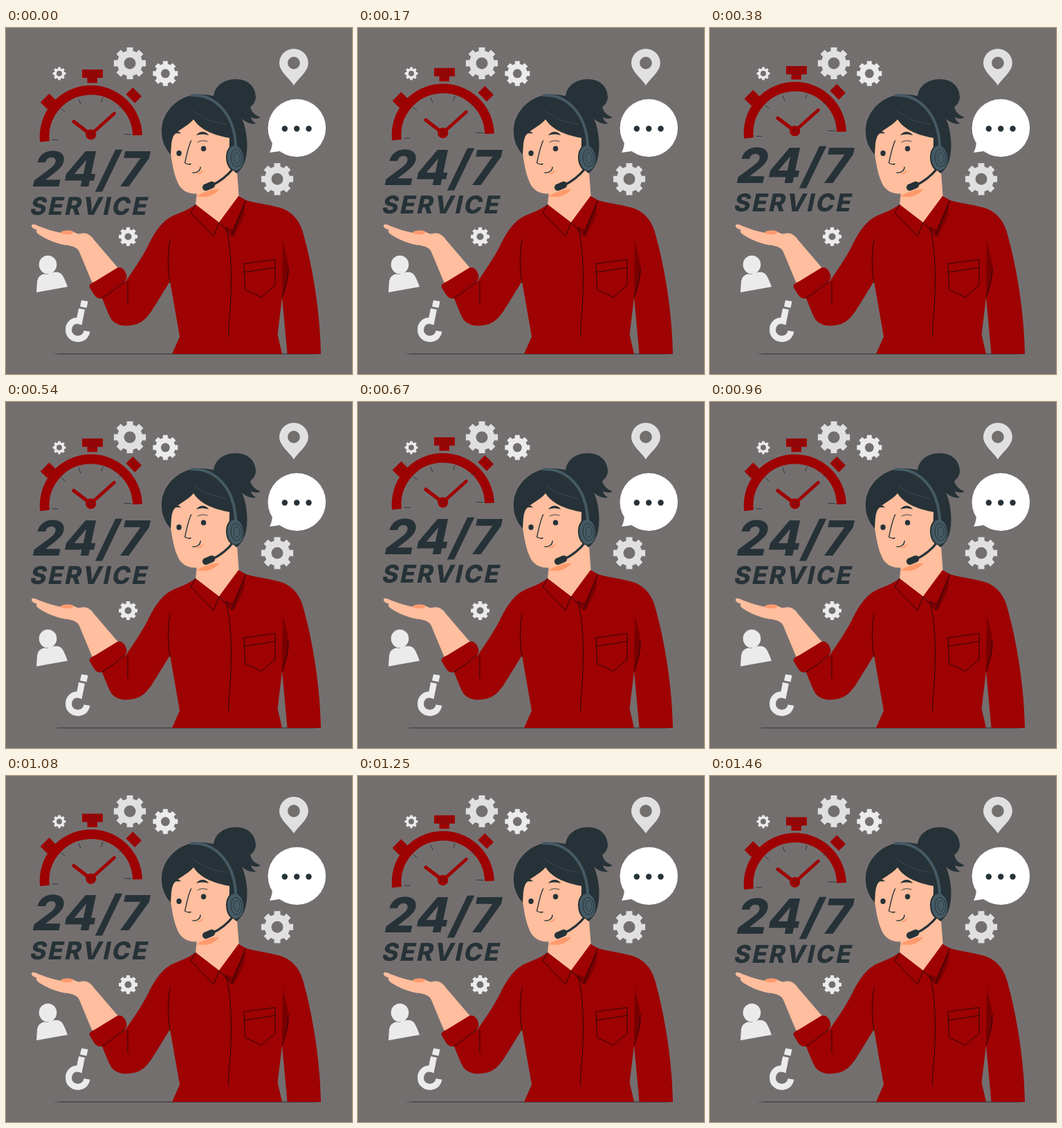
Animation of 500 by 500 pixels, one loop 1500 ms. Source, as an HTML page:

```html
<!DOCTYPE html>
<html lang="en">
<head>
<meta charset="utf-8">
<title>24/7 Service</title>
<style>
  html, body { margin: 0; width: 100%; height: 100%; overflow: hidden; background: #746f6f; }
  svg { display: block; width: 100vw; height: 100vh; }
  .red { fill: #9e0202; }
  .dark { fill: #263238; }
  .skin { fill: #ffbe9d; }
  .shade { fill: #ff9a6c; }
  .light { fill: #ebebeb; }
  .grey { fill: #e0e0e0; }
  .line { fill: none; stroke: #263238; stroke-width: .9; stroke-linecap: round; stroke-linejoin: round; }
  .seam { stroke: #1c0b0c; }
  .bold { stroke-width: 1.4; }
  .hatch { stroke-width: .6; opacity: .7; }
  text { font-family: Inter, "Open Sans", sans-serif; font-weight: 800; fill: #263238; text-anchor: middle; }
</style>
</head>
<body>
<svg viewBox="0 0 500 500">
  <path class="dark" d="M66 471 L80 470.500 H442 L456 471 L442 471.500 H80Z"/>

  <g id="gears"></g>

  <!-- map pin -->
  <path class="grey" fill-rule="evenodd" d="M416 83 C410 73 395 63 395 50.800 A20.900 20.900 0 0 1 436.800 50.800 C436.800 63 422 73 416 83Z M407 50.500 a8.900 8.900 0 1 0 17.800 0 a8.900 8.900 0 1 0 -17.800 0Z"/>

  <!-- speech bubble -->
  <g fill="#fff">
    <circle cx="420.300" cy="144.500" r="41.800"/>
    <path d="M385 163 Q385 172 381 180 Q391 179 400 177Z"/>
  </g>
  <g class="dark">
    <circle cx="402.800" cy="145.500" r="4.200"/>
    <circle cx="420.200" cy="145.500" r="4.200"/>
    <circle cx="437.500" cy="145.500" r="4.200"/>
  </g>

  <!-- user icon -->
  <g class="light">
    <ellipse cx="60.500" cy="342" rx="12.800" ry="13.300"/>
    <path d="M44 382 L45 367 C46 358 53 354 60 356 C67 353 77 350 82 358 C85 363 87 369 89 374Z"/>
  </g>

  <!-- inverted question mark -->
  <path class="light" d="M109 393.500 L118.500 395 L116.500 404.500 L107 402.500Z"/>
  <path d="M109.500 406 L106 423.500 C97 421 90.500 428 90.500 436 C90.500 445 98 450 106 449 C112 448 116 444 117 438" fill="none" stroke="#ebebeb" stroke-width="9"/>

  <!-- clock and lettering -->
  <g id="float">
    <path d="M56 164 A67.200 67.200 0 1 1 190 155" fill="none" stroke="#9e0202" stroke-width="13.800"/>
    <g class="red">
      <path d="M110 60 H140 V72 H132 V79.500 H117.500 V72 H110Z"/>
      <rect x="-9" y="-7" width="18" height="14" transform="translate(61 106) rotate(-45)"/>
      <rect x="-9" y="-7" width="18" height="14" transform="translate(184.700 97.300) rotate(45)"/>
    </g>
    <path class="line hatch" d="M115 61 V70 M120 61 V70 M125 61 V70 M130 61 V70 M135 61 V70 M118 72.300 H132 M56 104 L63 111 M60 100 L67 107 M180 96 L187 89 M185 101 L192 94"/>
    <path class="line" d="M67 161.500 H75 M80 117 L85 121 M105 103 L108 110 M140 101 L138 107 M164 115 L168 111 M171 153.500 L181 154"/>
    <g fill="none" stroke="#9e0202" stroke-linecap="round">
      <path stroke-width="5.200" d="M122.500 154 L98 135.300"/>
      <path stroke-width="4.600" d="M122.500 154 L156.500 123.500"/>
    </g>
    <circle class="red" cx="122.700" cy="154" r="7.600"/>
    <circle class="line hatch" cx="122.700" cy="154" r="3"/>
    <text transform="translate(118.500 229) skewX(-12)" font-size="70" letter-spacing="1.500">24/7</text>
    <text transform="translate(119 270.300) skewX(-12)" font-size="35.500" letter-spacing="2.600">SERVICE</text>
  </g>

  <!-- hand -->
  <path class="skin" d="M37 285 C39 282 44 285 49 287 C59 291 69 294 79 296 C83 292 91 292 97 294 C101 297 105 298 109 297 C117 295 123 300 127 306 L163 348 L127 374 L107 326 C104 317 98 316 90 314 C77 313 61 307 50 300 C45 297 42 293 45 292 C40 290 36 288 37 285Z"/>
  <path class="shade" d="M78 296 C83 291 92 292 98 294.500 C95 299 87 300 78 296Z"/>

  <!-- neck -->
  <path class="skin" d="M276 236 L274 255 L309 283 L337 250 L333 195 L300 200Z"/>
  <path class="shade" d="M275 243 C287 246 301 243 308 233 L292 234Z"/>

  <!-- shirt -->
  <path class="red" d="M274 255 C262 264 250 267 238 273 C221 283 212 301 205 315 C196 333 184 350 173 366 L138 389 C144 402 148 415 153 422 C160 430 172 432 184 429 C197 427 204 418 211 408 L237 366 L251 446 L240 471 H399 L392.500 443 L399 389 L406.500 471 H455 C454 410 443 344 429 295 C424 277 412 264 395 259.500 C378 255 361 253 347 249 L336 243 L308 281Z"/>
  <path class="red" d="M121 375 C119 371 123 369 129 366 L160 347 C165 344 171 348 173 354 C176 360 174 365 169 368 L143 388 C136 393 131 391 127 385Z"/>
  <g fill="#790000">
    <path d="M399 291 C399 317 409 331 408 353 C407 368 403 379 400 390 C397 360 402 330 399 291Z"/>
    <path d="M346 250 L344 271 L329 302 L316 287 L326 290Z"/>
  </g>
  <path class="red" d="M308 281 L336 243 L346.500 249 L327 291 L316 284Z"/>
  <g class="line seam">
    <path d="M139 390 C150 384 161 374 172 366 M176 367 V399"/>
    <path d="M237 306 C233 330 234 350 237 368"/>
    <path d="M318 288 C326 320 326 360 325 385 C325 407 321 427 321.500 446"/>
    <path d="M274 255 L267 267 L300 301 L308 281 L326 300 L346.500 249"/>
    <path d="M344 341 L345.500 378 L369 389 L389 372 V335Z M344 353 L389 346"/>
    <path d="M399 389 C404 371 408 365 408 345"/>
  </g>

  <!-- bun -->
  <path class="dark" d="M300 101 C300 84 315 74 332 74 C351 74 361 86 361 101 C360 108 356 112 353 114 C355 123 362 127 368 129 C364 132 358 131 354 129 C355 134 359 137 362 138 C353 140 344 135 338 128 C320 127 304 116 300 101Z"/>

  <!-- head -->
  <path class="skin" d="M266 115 C249 130 239 149 236 168 C239 187 241 208 248 223 C253 236 266 241 279 239 C296 237 313 226 326 206 L333 150Z"/>
  <path class="dark" d="M225 151 C224 132 234 115 251 104 C270 92 299 94 319 106 C338 118 346 137 348 160 C350 181 346 201 333 210 L322 200 L323 159 C303 155 282 149 271 132 C262 143 249 146 242 156 C238 164 239 175 238 183 C230 174 225 163 225 151Z"/>
  <path d="M270 119 C284 132 304 137 318 139" fill="none" stroke="#455a64" stroke-width=".6"/>

  <!-- face -->
  <g class="dark">
    <ellipse cx="250" cy="181" rx="3.700" ry="3.900"/>
    <ellipse cx="285.500" cy="174.300" rx="3.700" ry="3.900"/>
    <path d="M238.500 154 C242 148 249 147 253 152.500 C248 152 243 152 238.500 154Z"/>
    <path d="M275 155 C280 148 289 149 293 155 C287 153 281 153 275 155Z"/>
  </g>
  <path class="shade" d="M275 210.500 C280 210 283 207 284 204 C286 209 280 213 275 210.500Z"/>
  <path class="line" d="M277 165 Q283 161 291 164"/>
  <path class="line bold" d="M267.500 163 C263 172 261 184 258.500 195 Q263 198 267 196.500 M270 209 C276 210 281 206 281 201"/>

  <!-- headset -->
  <path d="M267 97.500 C300 95 330 122 332 171" fill="none" stroke="#455a64" stroke-width="4"/>
  <path d="M329 202 C322 211 313 220 298 227" fill="none" stroke="#263238" stroke-width="3.200"/>
  <rect class="dark" x="-9.500" y="-5" width="19" height="10" rx="5" transform="translate(293 228.500) rotate(-23)"/>
  <g transform="rotate(-4 331 188)">
    <ellipse class="dark" cx="329" cy="188" rx="11" ry="18.500"/>
    <ellipse cx="331.500" cy="188" rx="11.500" ry="18" fill="#455a64"/>
    <ellipse cx="333" cy="188" rx="8" ry="12.500" fill="#455a64" stroke="#263238" stroke-width=".9"/>
    <ellipse cx="333.500" cy="188" rx="4.500" ry="7.500" fill="#455a64" stroke="#263238" stroke-width=".7"/>
  </g>
</svg>
<script>
const LOOP = 1500, RISE = 10;
const float = document.getElementById('float');

// Eight tapered teeth around a disc with a round hole.
function gear(x, y, r, hole, kind) {
  const at = (a, d) => `${(x + d * Math.sin(a)).toFixed(2)} ${(y - d * Math.cos(a)).toFixed(2)}`;
  const base = r * 0.78;
  let d = '';
  for (let i = 0; i < 8; i++) {
    const a = i * Math.PI / 4;
    const join = i ? `A${base} ${base} 0 0 1 ` : 'M';
    d += `${join}${at(a - 0.25, base)}L${at(a - 0.19, r)}L${at(a + 0.19, r)}L${at(a + 0.25, base)}`;
  }
  const ring = `M${x - hole} ${y}a${hole} ${hole} 0 1 0 ${2 * hole} 0a${hole} ${hole} 0 1 0 ${-2 * hole} 0Z`;
  return `<path class="${kind}" fill-rule="evenodd" d="${d}Z${ring}"/>`;
}

document.getElementById('gears').innerHTML =
  gear(179, 51, 23.5, 8.5, 'grey') +
  gear(230.3, 65.8, 18.3, 6.5, 'light') +
  gear(77, 65.8, 9.5, 4, 'light') +
  gear(392, 218.3, 23.5, 8.5, 'grey') +
  gear(176.5, 301.5, 13.7, 5, 'light');

// Linear rise for half the loop, then linear fall.
function draw(ms) {
  const p = (ms % LOOP) / LOOP;
  const y = -RISE * (1 - Math.abs(1 - 2 * p));
  float.setAttribute('transform', `translate(0 ${y.toFixed(3)})`);
}

const start = performance.now();
function tick() {
  draw(performance.now() - start);
  requestAnimationFrame(tick);
}
tick();
</script>
</body>
</html>
```
